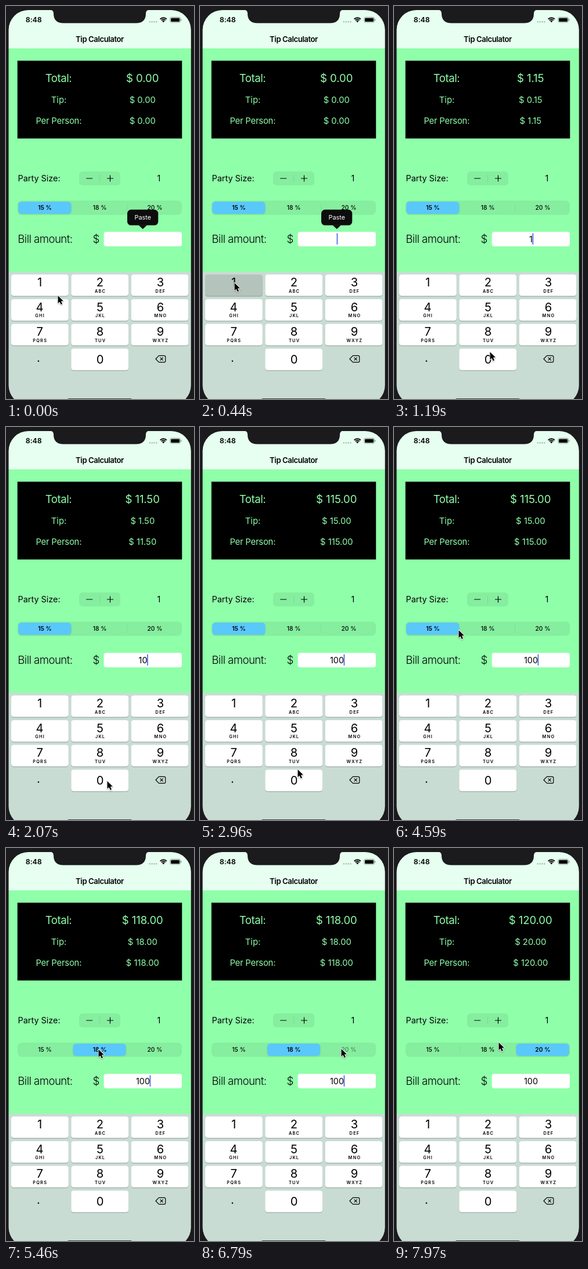
Recreate the animation shown at these times as an HTML page with a canvas. Size 324 px wide and 677 px high, loop 8 s.

```html
<!DOCTYPE html>
<html lang="en">
<head>
<meta charset="utf-8">
<title>Tip Calculator</title>
<style>
  html, body { margin: 0; width: 100%; height: 100%; overflow: hidden; background: #1b1a1c; }
  canvas { display: block; width: 324px; height: 677px; }
</style>
</head>
<body>
<canvas id="stage"></canvas>
<script>
const W = 324, H = 677, LOOP = 8000, STEP = 147.6;
const GREEN = '#8fffa9', MINT = '#e6fff0', TRACK = '#86ee9f', BLUE = '#5ac8fa', BEZEL = '#1b1a1c';
const canvas = document.getElementById('stage');
const ctx = canvas.getContext('2d');
const dpr = window.devicePixelRatio || 1;
canvas.width = W * dpr;
canvas.height = H * dpr;

// Pointer tip: step, x, y
const PATH = [
  [0, 89, 499], [1, 76, 491], [2, 63, 480], [3, 59, 477], [4, 59, 477],
  [5, 63, 484], [6, 92, 524], [7, 136, 572], [8, 165, 596], [10, 173, 607],
  [12, 174, 610], [19, 174, 610], [20, 168, 590], [21, 152, 500], [22, 150, 400],
  [23, 163, 290], [24, 186, 180], [25, 206, 112], [26, 211, 117], [27, 190, 221],
  [28, 156, 288], [29, 128, 330], [30, 113, 348], [31, 111, 350], [32, 111, 350],
  [33, 145, 348], [34, 159, 347], [39, 159, 347], [40, 168, 347], [42, 210, 346],
  [44, 240, 346], [45, 243, 346], [52, 243, 346], [53, 221, 341], [54, 180, 335]
];

function pointerAt(k) {
  let i = 1;
  while (i < PATH.length - 1 && PATH[i][0] < k) i++;
  const [a, ax, ay] = PATH[i - 1], [b, bx, by] = PATH[i];
  const u = Math.min(1, (k - a) / (b - a));
  return [ax + (bx - ax) * u, ay + (by - ay) * u];
}

function box(x, y, w, h, r, fill) {
  ctx.fillStyle = fill;
  ctx.beginPath();
  ctx.roundRect(x, y, w, h, r);
  ctx.fill();
}

function line(color, width, ...pts) {
  ctx.strokeStyle = color;
  ctx.lineWidth = width;
  ctx.beginPath();
  pts.forEach(([x, y], i) => i ? ctx.lineTo(x, y) : ctx.moveTo(x, y));
  ctx.stroke();
}

function text(s, x, y, size, weight = 400, color = '#000', align = 'center', spacing = 0) {
  ctx.font = `${weight} ${size}px Inter, sans-serif`;
  ctx.letterSpacing = spacing + 'px';
  ctx.textAlign = align;
  ctx.fillStyle = color;
  ctx.fillText(s, x, y);
  return ctx.measureText(s).width;
}

function statusBar() {
  ctx.fillStyle = BEZEL;
  ctx.beginPath();
  ctx.moveTo(75, 6);
  ctx.quadraticCurveTo(82, 7, 82, 13);
  ctx.quadraticCurveTo(82, 29.5, 99, 29.5);
  ctx.lineTo(224, 29.5);
  ctx.quadraticCurveTo(241, 29.5, 241, 13);
  ctx.quadraticCurveTo(241, 7, 248, 6);
  ctx.fill();

  text('8:48', 47.7, 28.2, 12.4, 600, '#000', 'center', -0.1);
  for (let i = 0; i < 4; i++) box(246.7 + i * 3.8, 26, 2.4, 2.4, 1.2, '#a9bcb0');

  // Wireless fan
  ctx.strokeStyle = '#000';
  ctx.lineWidth = 1.9;
  for (const r of [8, 5.1]) {
    ctx.beginPath();
    ctx.arc(271.3, 28.3, r, -Math.PI * 0.75, -Math.PI * 0.25);
    ctx.stroke();
  }
  ctx.fillStyle = '#000';
  ctx.beginPath();
  ctx.moveTo(271.3, 28.3);
  ctx.arc(271.3, 28.3, 3, -Math.PI * 0.75, -Math.PI * 0.25);
  ctx.fill();

  // Battery
  ctx.strokeStyle = '#7f8d85';
  ctx.lineWidth = 0.9;
  ctx.beginPath();
  ctx.roundRect(282.9, 19.4, 17.6, 8.8, 2.4);
  ctx.stroke();
  box(284.2, 20.7, 15, 6.2, 1.2, '#000');
  box(301.3, 22.3, 1.2, 3, 0.6, '#7f8d85');
}

function results(bill, pct) {
  box(19.7, 94.3, 283.6, 134, 0, '#000');
  const tip = bill * pct / 100, total = bill + tip;
  const money = v => '$ ' + v.toFixed(2);
  text('Total:', 90.5, 131, 18.5, 400, GREEN, 'center', -0.4);
  text('Tip:', 91, 166.5, 14.8, 400, GREEN);
  text('Per Person:', 90.8, 202.7, 14.8, 400, GREEN, 'center', -0.2);
  text(money(total), 235.2, 131, 18.6, 400, GREEN, 'center', -0.1);
  text(money(tip), 235.3, 166.5, 14.8, 400, GREEN);
  text(money(total), 235.3, 202.7, 14.8, 400, GREEN);
}

function stepper() {
  text('Party Size:', 20.5, 302.3, 14.4, 400, '#000', 'left');
  box(126, 285, 71, 24, 6, TRACK);
  line('#000', 1.2, [138.2, 297], [149.2, 297]);
  line('#000', 1.2, [174, 297], [185, 297]);
  line('#000', 1.2, [179.5, 291.5], [179.5, 302.5]);
  line('#79d691', 0.9, [161.5, 290.5], [161.5, 303.5]);
  text('1', 263.5, 302.3, 14.4);
}

// Fraction of the thumb's slide, n steps after release
const slide = n => n < 0 ? 0 : 1 - 0.26 ** (1 + 1.6 * n);

function segments(k, active) {
  box(20, 335.3, 283, 24.4, 7, TRACK);
  if (active === 0) line('#7be093', 0.9, [208.7, 341], [208.7, 354]);
  if (active === 2) line('#7be093', 0.9, [114, 341], [114, 354]);
  const pos = slide(k - 35) + slide(k - 47);
  ctx.save();
  ctx.shadowColor = 'rgba(0,0,0,0.1)';
  ctx.shadowBlur = 3 * dpr;
  ctx.shadowOffsetY = dpr;
  box(21.2 + pos * 94.7, 337, 91.2, 21, 5.5, BLUE);
  ctx.restore();
  const pressed = k === 34 ? 1 : k === 46 ? 2 : -1;
  ['15 %', '18 %', '20 %'].forEach((s, i) => {
    ctx.globalAlpha = i === pressed ? 0.45 : 1;
    text(s, 67 + i * 94.7, 351.4, 10.3, i === active ? 600 : 500);
    ctx.globalAlpha = 1;
  });
}

function caretOn(k) {
  if (k < 21) return (k >= 1 && k < 9) || k >= 12;
  return (k * STEP - 5440 + 4 * 968) % 968 < 440;
}

function billRow(k, bill) {
  text('Bill amount:', 20.3, 408.4, 18.6, 300, '#000', 'left', -0.52);
  text('$', 155.3, 408.4, 18.6, 300);
  box(168.6, 389, 134.4, 25, 4, '#fff');
  const width = bill ? text(String(bill), 236, 406.8, 14.4) : 0;
  if (caretOn(k)) box(235.6 + width / 2, 391.5, 1.7, 19.5, 0.8, '#4468e8');
}

function pasteMenu() {
  box(209, 350.8, 53.3, 27, 6.5, '#0c0d0c');
  ctx.beginPath();
  ctx.moveTo(228.5, 377.5);
  ctx.lineTo(235.8, 384.3);
  ctx.lineTo(243, 377.5);
  ctx.fill();
  text('Paste', 235.8, 368.3, 10.9, 400, '#fff');
}

function keypad(pressed) {
  box(0, 458, W, H - 458, 0, '#c8dcd3');
  const letters = ['', 'ABC', 'DEF', 'GHI', 'JKL', 'MNO', 'PQRS', 'TUV', 'WXYZ'];
  const key = (label, sub, col, row) => {
    const x = 9 + col * 103.3, y = 462.4 + row * 42.6;
    box(x, y + 1, 98.8, 37.2, 4.2, '#8e9d96');
    box(x, y, 98.8, 37.2, 4.2, label === pressed ? '#b4c3bb' : '#fff');
    const mid = 58.1 + col * 103.9;
    text(label, mid, y + (row < 3 ? 20.8 : 25.4), 20.2);
    if (sub) text(sub, mid + 0.6, y + 31.3, 7.3, 600, '#000', 'center', 1.3);
  };
  letters.forEach((sub, i) => key(String(i + 1), sub, i % 3, Math.floor(i / 3)));
  key('0', '', 1, 3);
  text('.', 56, 613, 20.2);

  // Delete
  ctx.lineJoin = 'round';
  ctx.strokeStyle = '#000';
  ctx.lineWidth = 1.2;
  ctx.beginPath();
  ctx.moveTo(258, 608);
  ctx.lineTo(263.4, 602.4);
  ctx.lineTo(272.6, 602.4);
  ctx.quadraticCurveTo(274.8, 602.4, 274.8, 604.6);
  ctx.lineTo(274.8, 611.4);
  ctx.quadraticCurveTo(274.8, 613.6, 272.6, 613.6);
  ctx.lineTo(263.4, 613.6);
  ctx.closePath();
  ctx.stroke();
  line('#000', 1.2, [265.6, 605.4], [270.8, 610.6]);
  line('#000', 1.2, [270.8, 605.4], [265.6, 610.6]);
  box(106, 676, 111, 4.2, 2.1, '#33403a');
}

function pointer(x, y) {
  ctx.save();
  ctx.translate(x, y);
  ctx.scale(0.9, 0.9);
  ctx.beginPath();
  [[0.6, 0], [0.6, 14.6], [3.9, 11.6], [6.3, 17], [8.9, 15.9], [6.5, 10.6], [11, 10.4]]
    .forEach(([px, py]) => ctx.lineTo(px, py));
  ctx.closePath();
  ctx.lineJoin = 'round';
  ctx.strokeStyle = '#fff';
  ctx.lineWidth = 2;
  ctx.shadowColor = 'rgba(0,0,0,0.3)';
  ctx.shadowBlur = 2 * dpr;
  ctx.shadowOffsetY = dpr;
  ctx.stroke();
  ctx.shadowColor = 'transparent';
  ctx.fillStyle = '#000';
  ctx.fill();
  ctx.restore();
}

function draw(t) {
  const k = Math.floor(t / STEP + 0.06);
  const bill = k < 5 ? 0 : k < 14 ? 1 : k < 17 ? 10 : 100;
  const active = k < 35 ? 0 : k < 47 ? 1 : 2;
  const pressed = k === 3 || k === 4 ? '1' : k === 13 || k === 16 ? '0' : '';

  ctx.setTransform(dpr, 0, 0, dpr, 0, 0);
  box(0, 0, W, H, 0, BEZEL);
  ctx.save();
  ctx.beginPath();
  ctx.roundRect(4.5, 7, 314.3, 680.5, 34);
  ctx.clip();
  box(0, 0, W, 73, 0, MINT);
  box(0, 73, W, 385, 0, GREEN);
  statusBar();
  text('Tip Calculator', 161.5, 61.9, 13.1, 600, '#000', 'center', -0.4);
  results(bill, [15, 18, 20][active]);
  stepper();
  segments(k, active);
  billRow(k, bill);
  if (k < 5) pasteMenu();
  keypad(pressed);
  ctx.restore();
  pointer(...pointerAt(k));
}

function tick() {
  draw(performance.now() % LOOP);
  requestAnimationFrame(tick);
}
tick();
</script>
</body>
</html>
```
